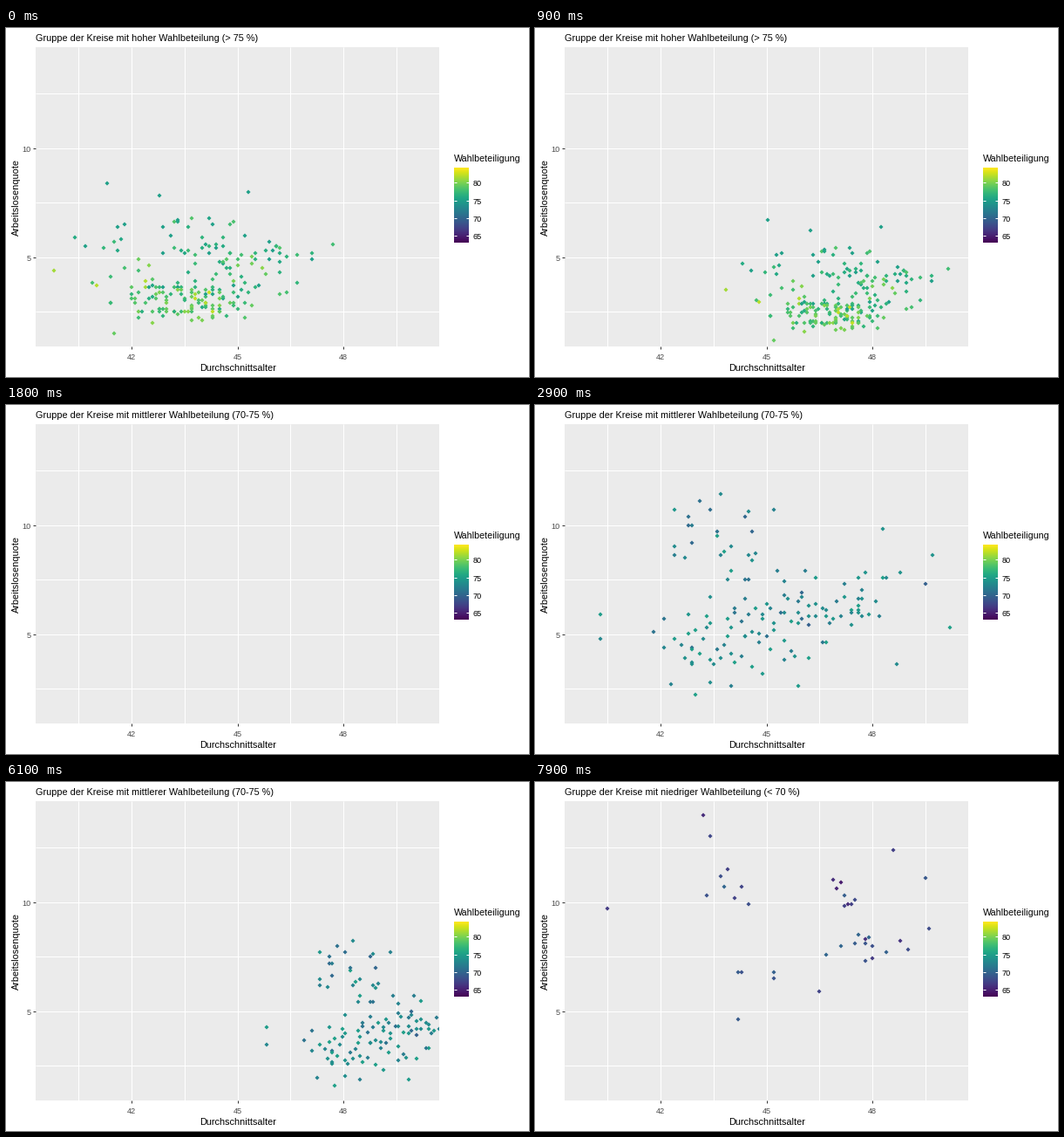
Recreate the animation shown at these times as a matplotlib script. Size 600 px wide and 400 px high, loop 8000 ms.

```python
import numpy as np
import matplotlib.pyplot as plt
from matplotlib.animation import FuncAnimation
from matplotlib.patches import Rectangle

W, H, DPI = 600, 400, 100
STEP_MS, FRAMES = 100, 80
MOVE, CYCLE, SWITCH = 25, 50, 12      # steps per move, per state, title change
ENTER, EXIT = np.array([0, 20]), np.array([60, 0])
Z_MIN, Z_MAX = 63.1, 84.2
L, R, T, B = 34, 497, 22, 365         # plot panel
PT = 72 / DPI

plt.rcParams["font.family"] = "Liberation Sans"
rng = np.random.default_rng(12)
cmap = plt.get_cmap("viridis")


def cluster(n, age, rate, w, h):
    """n districts, densest at (age, rate), thinning out to +-w and +-h."""
    spread = rng.triangular(-1, 0, 1, (n, 2))
    return [age, rate] + spread * [w, h]


def group(extremes, clusters):
    return np.round(np.vstack([extremes] + [cluster(*c) for c in clusters]), 1)


def shade(pts, base, slope, noise, lo, hi):
    """Turnout falls with unemployment; return it as colours."""
    z = base - slope * pts[:, 1] + rng.normal(0, noise, len(pts))
    return cmap((np.clip(z, lo, hi) - Z_MIN) / (Z_MAX - Z_MIN))


def px(age):
    return 144 + 40.5 * (age - 42)


def py(rate):
    return 262.5 - 25 * (rate - 5)


def pz(z):
    return 177 + 4.07 * (80 - z)


high = group([(39.8, 4.4), (40.4, 5.9), (41.3, 8.4), (42.8, 7.8), (45.3, 8.0),
              (47.7, 5.6), (41.5, 1.5)],
             [(95, 43.9, 2.9, 1.9, 1.1), (66, 44.8, 4.6, 2.5, 1.6),
              (26, 41.8, 4.4, 1.7, 2.8), (10, 44.0, 6.6, 1.5, 0.6)])
mid = group([(40.3, 5.9), (40.3, 4.8), (43.1, 11.1), (43.7, 11.4), (48.3, 9.8),
             (49.7, 8.6), (50.2, 5.3), (48.7, 3.6), (43.0, 2.2)],
            [(58, 44.0, 4.8, 2.6, 2.5), (30, 46.2, 6.1, 1.8, 1.0),
             (27, 43.9, 9.0, 2.2, 1.9), (20, 47.7, 6.6, 2.0, 2.6)])
low = group([(43.4, 13.0), (43.2, 14.0), (40.5, 9.7), (48.6, 12.4), (49.5, 11.1),
             (49.6, 8.8), (46.5, 5.9), (44.2, 4.6)],
            [(13, 47.7, 7.9, 1.4, 0.9), (8, 47.3, 10.2, 1.2, 1.3),
             (7, 44.0, 10.2, 0.9, 1.6), (4, 44.7, 6.6, 1.5, 0.9)])
groups = [high, mid, low]
colors = [shade(high, 80.8, 0.8, 1.7, 75, 83.5),
          shade(mid, 75, 0.32, 1.4, 69.5, 75),
          shade(low, 69.2, 0.15, 1.4, 63, 70)]
TITLES = ["hoher Wahlbeteilung (> 75 %)",
          "mittlerer Wahlbeteilung (70-75 %)",
          "niedriger Wahlbeteilung (< 70 %)"]

fig = plt.figure(figsize=(W / DPI, H / DPI), dpi=DPI, facecolor="white")
ax = fig.add_axes([0, 0, 1, 1])
ax.axis("off")


def label(x, y, s, size=10.9, color="black", **kw):
    kw.setdefault("va", "center_baseline")
    return ax.text(x, y, s, fontsize=size * PT, color=color, **kw)


def hline(x0, x1, y, color="white", z=2):
    ax.plot([x0, x1], [y + 0.3] * 2, color=color, lw=PT, zorder=z,
            solid_capstyle="butt")


def vline(x, y0, y1, color="white"):
    ax.plot([x, x], [y0, y1], color=color, lw=PT, zorder=2,
            solid_capstyle="butt")


panel = Rectangle((L, T), R - L, B - T, fc="#EBEBEB", ec="none", zorder=1)
ax.add_patch(panel)

for age in np.arange(40.5, 50, 1.5):
    vline(px(age), T, B)
for rate in np.arange(2.5, 13, 2.5):
    hline(L, R, py(rate))
for age in (42, 45, 48):
    vline(px(age), B, B + 3, "#333333")
    label(px(age), 376, str(age), 9.2, "#4D4D4D", ha="center")
for rate in (5, 10):
    hline(L - 3, L, py(rate), "#333333")
    label(29, py(rate) + 0.8, str(rate), 9.2, "#4D4D4D", ha="right")

title = label(L, 15, "", va="baseline")
label(266, 393, "Durchschnittsalter", ha="center", va="baseline")
label(15, 194, "Arbeitslosenquote", rotation=90, ha="center", va="baseline",
      rotation_mode="anchor")
label(514, 153, "Wahlbeteiligung", 10.6, va="baseline")

ax.imshow(np.linspace(1, 0, 256)[:, None], cmap=cmap, vmin=0, vmax=1,
          extent=(514, 531, 246, 160), aspect="auto", zorder=2)
for z in (65, 70, 75, 80):
    hline(514, 517.4, pz(z), z=3)
    hline(527.6, 531, pz(z), z=3)
    label(536, pz(z) + 0.8, str(z), 9.2)

dots = ax.scatter([], [], s=(3.6 * PT) ** 2, marker="D", linewidths=0, zorder=4)
dots.set_clip_path(panel)
ax.set_xlim(0, W)
ax.set_ylim(H, 0)


def update(i):
    g, k = divmod(i - 4, CYCLE)
    f = min(k / MOVE, 1)
    leaving = groups[g] + (EXIT - groups[g]) * f
    coming = ENTER + (groups[g + 1] - ENTER) * f
    pts = np.vstack([leaving, coming])
    dots.set_offsets(np.round(np.column_stack([px(pts[:, 0]), py(pts[:, 1])])))
    dots.set_facecolors(np.vstack([colors[g], colors[g + 1]]))
    title.set_text("Gruppe der Kreise mit " + TITLES[g + (k >= SWITCH)])
    return dots, title


anim = FuncAnimation(fig, update, frames=FRAMES, interval=STEP_MS,
                     repeat=True, repeat_delay=0)
plt.show()
```
